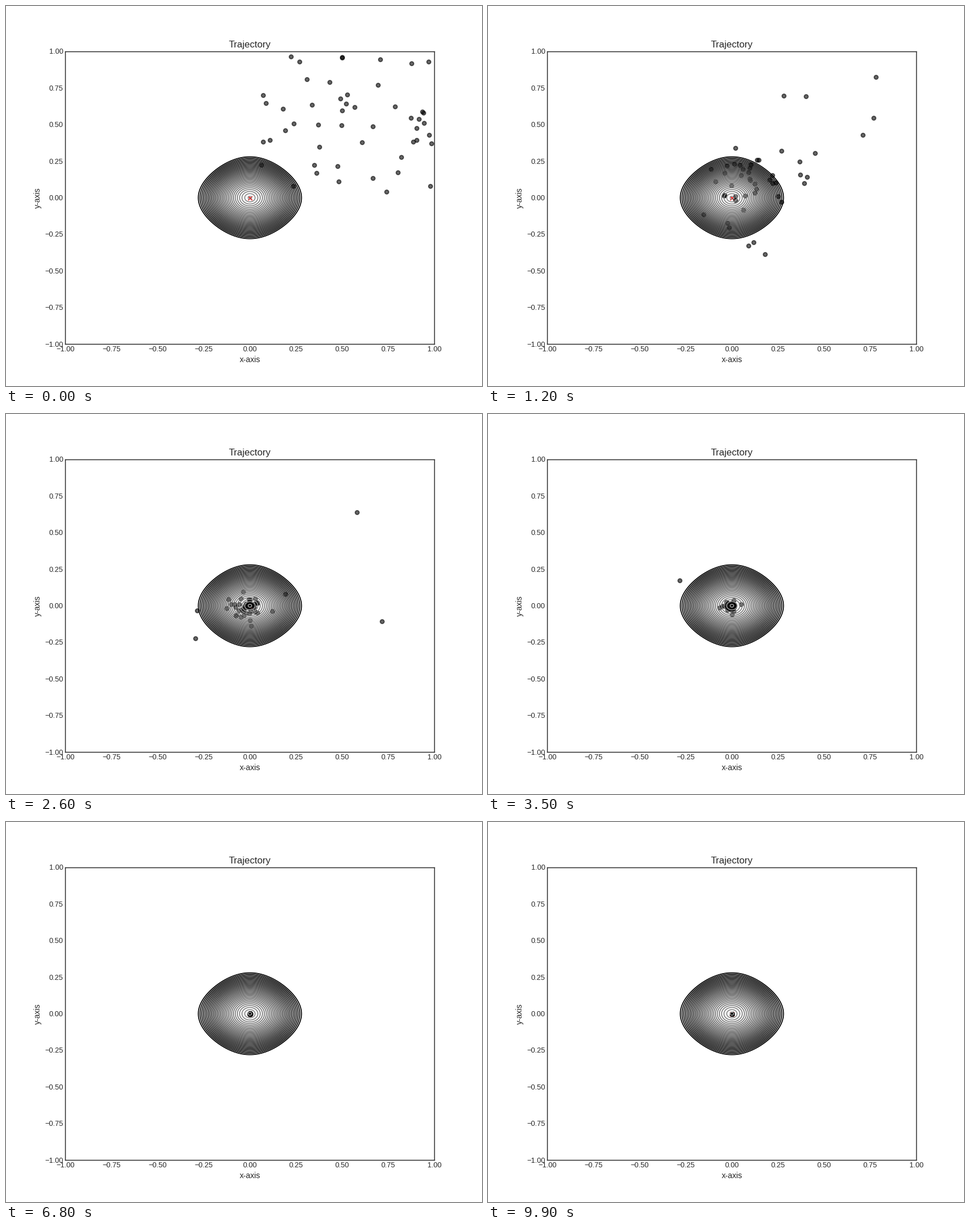
Recreate the animation shown at these times as a matplotlib script. Size 837 by 669 pixels, loop 10000 ms.

```python
import numpy as np
import matplotlib.pyplot as plt
from matplotlib.animation import FuncAnimation

W, H, DPI = 837, 669, 96
FRAMES, INTERVAL = 100, 100
PT = 83.7 / DPI          # point sizes refer to a 10 inch wide figure

PARTICLES = 50
INERTIA, OWN_PULL, SWARM_PULL = 0.8, 0.5, 0.3

plt.rcParams.update({
    "font.family": "Liberation Sans",
    "text.color": ".15",
    "axes.labelcolor": ".15",
    "axes.edgecolor": ".15",
    "xtick.color": ".15",
    "ytick.color": ".15",
    "axes.linewidth": 1.25 * PT,
    "axes.titlepad": 6 * PT,
    "axes.labelpad": 4 * PT,
    "lines.linewidth": 1.5 * PT,
})


def ackley(x, y):
    bowl = 20 * (1 - np.exp(-0.2 * np.sqrt((x * x + y * y) / 2)))
    waves = np.exp((np.cos(2 * np.pi * x) + np.cos(2 * np.pi * y)) / 2)
    return bowl + np.e - waves


def fly(steps, seed):
    """Particle swarm search; returns the positions at every step."""
    rng = np.random.default_rng(seed)
    pos = rng.random((PARTICLES, 2))
    vel = rng.random((PARTICLES, 2))
    best, best_cost = pos.copy(), np.full(PARTICLES, np.inf)
    history = []
    for _ in range(steps):
        history.append(pos)
        cost = ackley(*pos.T)
        better = cost < best_cost
        best[better], best_cost[better] = pos[better], cost[better]
        leader = best[best_cost.argmin()]
        own, swarm = rng.random((2, PARTICLES, 2))
        vel = (INERTIA * vel + OWN_PULL * own * (best - pos)
               + SWARM_PULL * swarm * (leader - pos))
        pos = pos + vel
    return history


history = fly(FRAMES, seed=4)

fig, ax = plt.subplots(figsize=(W / DPI, H / DPI), dpi=DPI, facecolor="white")
fig.subplots_adjust(left=104.45 / W, right=0.9,
                    bottom=73.66 / H, top=589.25 / H)
ax.set_title("Trajectory", fontsize=14.4 * PT)
ax.set_xlabel("x-axis", fontsize=12 * PT)
ax.set_ylabel("y-axis", fontsize=12 * PT)
ticks = np.linspace(-1, 1, 9)
ax.set(xticks=ticks, yticks=ticks)
ax.tick_params(length=0, pad=3.5 * PT, labelsize=11 * PT)

grid = np.arange(-300, 301) / 1000
xx, yy = np.meshgrid(grid, grid)
ax.contour(xx, yy, ackley(xx, yy), levels=0.03 + 0.07 * np.arange(29),
           cmap="Greys", vmin=-2, vmax=1.99, zorder=2)

dot = {"s": 36 * PT ** 2, "linewidths": 1.5 * PT, "zorder": 1}
ax.scatter([0], [0], color="red", marker="x", **dot)
swarm = ax.scatter(*history[0].T, c="black", alpha=0.6, **dot)
ax.set(xlim=(-1, 1), ylim=(-1, 1))


def update(i):
    swarm.set_offsets(history[i])
    return (swarm,)


anim = FuncAnimation(fig, update, frames=FRAMES, interval=INTERVAL,
                     repeat=True, repeat_delay=0, blit=False)
plt.show()
```
